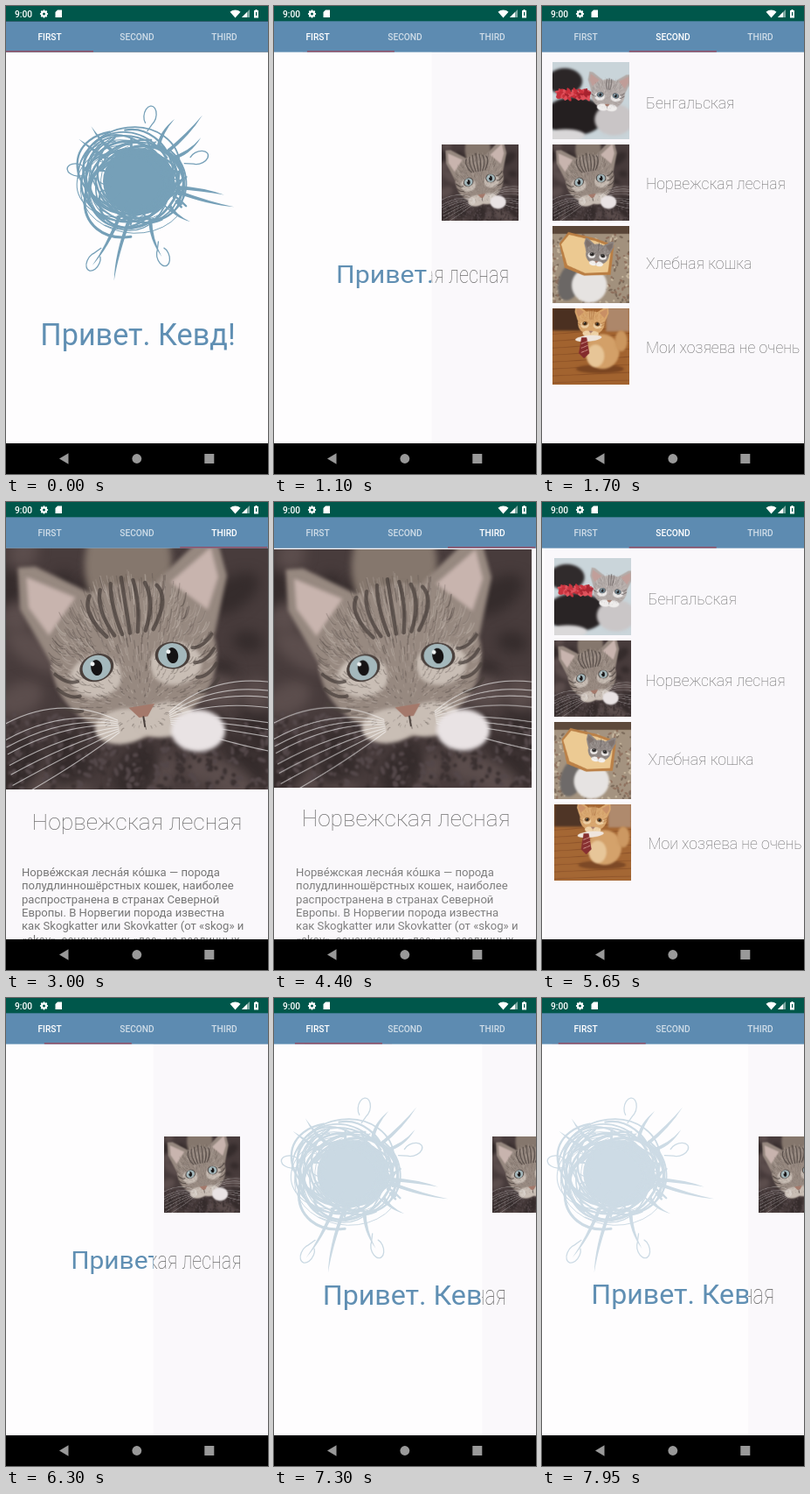
Write an HTML page with a canvas that moves like this. It is 300 px wide and 534 px high and loops after 8000 ms.

```html
<!DOCTYPE html>
<html lang="ru">
<head>
<meta charset="utf-8">
<style>
  html, body { margin: 0; width: 100%; height: 100%; overflow: hidden; background: #000; }
  canvas { display: block; width: 300px; height: 534px; }
</style>
</head>
<body>
<canvas id="stage"></canvas>
<script>
const W = 300, H = 534, LOOP = 8000, STEP = 50;
const STATUS = 17.5, TOP = 52.5, BOTTOM = 499;
const canvas = document.getElementById('stage');
const ctx = canvas.getContext('2d');
const ratio = Math.max(1, window.devicePixelRatio || 1);
canvas.width = W * ratio;
canvas.height = H * ratio;

const lerp = (a, b, u) => a + (b - a) * u;
const clamp = v => Math.max(0, Math.min(1, v));
const linear = u => u;
const easeIn = u => u * u;
const easeOut = u => 1 - (1 - u) ** 3;
const easeBoth = u => u * u * (3 - 2 * u);

// Swipes: start and end time, page reached, easing
const swipes = [
  [0, 850, .24, easeIn],
  [850, 1700, 1, easeBoth],
  [2650, 3000, 2, easeBoth],
  [4350, 4600, 1.41, easeIn],
  [4600, 5150, 1, easeOut],
  [5600, 6300, .437, easeBoth],
  [6400, 6650, .9, easeBoth],
  [6750, 7150, .6, easeIn],
  [7150, 7650, 0, easeOut],
  [7800, 7950, .213, linear]
];

function pageAt(t) {
  return swipes.reduce((page, [start, end, to, ease]) =>
    lerp(page, to, ease(clamp((t - start) / (end - start)))), 0);
}

function seeded(seed) {
  return () => (seed = (seed * 16807) % 2147483647) / 2147483647;
}

// Drawing helpers
function ell(g, color, x, y, rx, ry = rx, rot = 0) {
  g.fillStyle = color;
  g.beginPath();
  g.ellipse(x, y, rx, ry, rot, 0, 7);
  g.fill();
}
function poly(g, color, ...pts) {
  g.fillStyle = color;
  g.beginPath();
  for (let i = 0; i < pts.length; i += 2) g.lineTo(pts[i], pts[i + 1]);
  g.closePath();
  g.fill();
}
function curve(g, color, width, x0, y0, cx, cy, x1, y1) {
  g.strokeStyle = color;
  g.lineWidth = width;
  g.beginPath();
  g.moveTo(x0, y0);
  g.quadraticCurveTo(cx, cy, x1, y1);
  g.stroke();
}
function rect(g, color, x, y, w, h) {
  g.fillStyle = color;
  g.fillRect(x, y, w, h);
}
function picture(w, h, scale, draw) {
  const c = document.createElement('canvas');
  c.width = w * scale;
  c.height = h * scale;
  const g = c.getContext('2d');
  g.scale(scale, scale);
  g.lineCap = 'round';
  draw(g);
  return c;
}
function soft(g, px, draw) {
  g.filter = `blur(${px}px)`;
  draw();
  g.filter = 'none';
}
function speckle(g, colors, count, size, x, y, w, h) {
  const rnd = seeded(count + 7);
  for (let i = 0; i < count; i++) {
    const color = colors[i % colors.length];
    ell(g, color, x + rnd() * w, y + rnd() * h, size * (.4 + rnd()), size * .6, rnd() * 3);
  }
}

// A cat's head in units of its half width
function catHead(g, x, y, r, tilt, look) {
  const { fur, dark, light, ear, eye, stripes = 0, whiskers = 0 } = look;
  const rnd = seeded(19), sides = [-1, 1];
  g.save();
  g.translate(x, y);
  g.rotate(tilt);
  g.scale(r, r);
  soft(g, r * .04, () => {
    for (const s of sides) {
      poly(g, fur, s * .95, -.2, s * 1.2, -.85, s * 1.15, -1.32, s * .95, -1.3, s * .3, -.85);
      poly(g, ear, s * .92, -.5, s * 1.1, -.85, s * 1.07, -1.2, s * .55, -.88);
    }
    ell(g, fur, 0, -.1, .95, .86);
    ell(g, fur, 0, .4, .6, .42);
    for (const s of sides) {
      ell(g, light, s * .46, .05, .3, .24);
      ell(g, light, s * .24, .66, .33, .2);
    }
    ell(g, fur, 0, .1, .17, .45);
  });

  // Fur radiates from the nose
  for (let i = 0; i < 900; i++) {
    const a = rnd() * 2 * Math.PI, d = Math.sqrt(rnd()) * .86, k = 1.13;
    const px = Math.cos(a) * d, py = Math.sin(a) * d * .95 - .1;
    g.globalAlpha = .15 + .25 * rnd();
    curve(g, rnd() < .5 ? dark : light, .012, px, py, px * 1.07, py, px * k, .5 + (py - .5) * k);
  }
  g.globalAlpha = .75;
  for (let i = -stripes; i <= stripes; i++) {
    curve(g, dark, .045, i * .13, -1.02 + Math.abs(i) * .05, i * .17, -.7, i * .09, -.38);
    const s = i < 0 ? -1 : 1, row = Math.abs(i) * .17;
    curve(g, dark, .04, s * .68, row - .1, s * .8, row - .08, s * .92, row - .22);
  }
  g.globalAlpha = 1;

  for (const s of sides) {
    ell(g, dark, s * .44, -.05, .2, .155, s * .2);
    ell(g, eye, s * .44, -.05, .165, .14, s * .2);
    ell(g, '#151314', s * .44, -.05, .065, .09);
    ell(g, '#eef2f2', s * .44 - .04, -.1, .025);
  }
  poly(g, '#a4796b', -.15, .46, .15, .46, .05, .59, -.05, .59);
  curve(g, dark, .02, 0, .59, 0, .65, 0, .7);
  for (let i = 0; i < whiskers; i++) {
    for (const s of sides) {
      const end = .25 + i * .95 / whiskers + rnd() * .08;
      curve(g, 'rgba(255,255,255,.6)', .011, s * .3, .58 + i * .02, s * .9, end - .1, s * 1.6, end + .15);
    }
  }
  g.restore();
}

// Photos
const tabby = picture(300, 276, 2, g => {
  rect(g, '#483c3c', 0, 0, 300, 276);
  soft(g, 14, () => speckle(g, ['#352c2c', '#5c4e4d'], 40, 30, 0, 0, 300, 276));
  soft(g, 2, () => speckle(g, ['#3c3232', '#54484a'], 400, 4, 0, 190, 300, 86));
  soft(g, 8, () => ell(g, '#85776d', 140, 20, 50, 70));
  catHead(g, 148, 135, 100, -.16, {
    fur: '#978980', dark: '#4a403c', light: '#c9beb5', ear: '#c8b4ae',
    eye: '#a4b8bc', stripes: 3, whiskers: 8
  });
  soft(g, 5, () => ell(g, '#e9e3e4', 220, 209, 31, 24));
});

const kittens = picture(87, 88, 3, g => {
  rect(g, '#c9d4d9', 0, 0, 87, 88);
  soft(g, 4, () => {
    ell(g, '#2b2627', 14, 22, 20, 15);
    ell(g, '#241f20', 25, 62, 34, 22);
    ell(g, '#c9c5c6', 70, 66, 22, 18);
    ell(g, '#d9d7d8', 15, 84, 22, 7);
  });
  speckle(g, ['#c9303b', '#e0505a', '#a8232f'], 90, 3, 6, 33, 36, 9);
  catHead(g, 63, 39, 20, .08, {
    fur: '#b3aaa7', dark: '#5a5251', light: '#efedec', ear: '#c09d98', eye: '#6b828e', stripes: 1
  });
});

const bread = picture(87, 88, 3, g => {
  rect(g, '#a2917d', 0, 0, 87, 88);
  speckle(g, ['#7b6959', '#c4b49c', '#8d6f5c'], 260, 2, 0, 10, 87, 78);
  rect(g, '#594537', 0, 0, 87, 9);
  soft(g, 3, () => {
    ell(g, '#6b6765', 20, 64, 13, 22, .3);
    ell(g, '#e6e3e1', 42, 68, 20, 20);
  });
  poly(g, '#ba7e43', 8, 20, 18, 7, 48, 14, 70, 22, 66, 56, 36, 57, 14, 48);
  poly(g, '#ecc991', 10, 21, 19, 10, 48, 17, 67, 24, 63, 53, 37, 54, 17, 45);
  catHead(g, 51, 34, 14, .15, {
    fur: '#8d8480', dark: '#4c4644', light: '#f4f1ef', ear: '#7c706b', eye: '#3a3735'
  });
});

const ginger = picture(87, 88, 3, g => {
  rect(g, '#a2632f', 0, 0, 87, 88);
  for (let i = 0; i < 9; i++) curve(g, '#8a4f25', .8, 0, 30 + i * 8, 40, 28 + i * 8, 87, 20 + i * 9);
  soft(g, 3, () => {
    rect(g, '#4b3021', 0, 0, 32, 26);
    rect(g, '#ad876a', 61, 0, 26, 27);
    ell(g, '#7a4521', 54, 70, 27, 5);
    ell(g, '#d3a068', 57, 50, 19, 20);
    ell(g, '#cb965e', 78, 38, 7, 12);
    ell(g, '#e7c597', 49, 55, 10, 13);
  });
  catHead(g, 44, 19, 16, .05, {
    fur: '#d9a66c', dark: '#a3683a', light: '#efd3a8', ear: '#c98f64', eye: '#6b4a26', stripes: 1
  });
  ell(g, '#efe5dc', 41, 35, 15, 3.5, -.1);
  poly(g, '#842b2c', 33, 34, 39, 34, 42, 52, 36, 58, 30, 52);
  for (let i = 0; i < 3; i++) curve(g, '#d59a90', .8, 33, 41 + i * 5, 36, 40 + i * 5, 40, 38 + i * 5);
});

// Scribble: loops and dashes around a dense core, with loose ends
const looseEnds = [
  [-60, 82], [-46, 105], [-35, 87], [-131, 83], [-145, 84], [9, 99],
  [15, 113], [38, 75], [73, 90], [104, 117], [119, 110]
];
const curls = [[165, 125], [81, 187], [180, 286], [221, 173], [100, 292]];

function scribble(color) {
  const rnd = seeded(77), cx = 152, cy = 200;
  const jitter = size => (rnd() - .5) * size;
  ctx.lineCap = 'round';
  ctx.strokeStyle = color;
  ell(ctx, color, cx, cy, 41, 38);
  for (let i = 0; i < 26; i++) {
    const start = rnd() * 7;
    ctx.lineWidth = .9 + rnd() * 2.2;
    ctx.beginPath();
    ctx.ellipse(146 + jitter(26), 200 + jitter(24), 42 + rnd() * 19, 36 + rnd() * 17,
      jitter(1.6), start, start + 3.5 + rnd() * 2);
    ctx.stroke();
  }
  for (let i = 0; i < 34; i++) {
    const a = rnd() * 7, x = cx + 42 * Math.cos(a), y = cy + 38 * Math.sin(a);
    curve(ctx, color, 1 + rnd() * 2, x + jitter(24), y + jitter(24), x, y, x + jitter(30), y + jitter(30));
  }
  for (const [deg, reach] of looseEnds) {
    const a = deg * Math.PI / 180, dx = Math.cos(a), dy = Math.sin(a), bend = jitter(16);
    const mx = cx + dx * reach * .75 - dy * bend, my = cy + dy * reach * .75 + dx * bend;
    ctx.fillStyle = color;
    ctx.beginPath();
    ctx.moveTo(cx + dx * 45 - dy * 2, cy + dy * 45 + dx * 2);
    ctx.quadraticCurveTo(mx - dy * 2, my + dx * 2, cx + dx * reach, cy + dy * reach);
    ctx.quadraticCurveTo(mx + dy * 2, my - dx * 2, cx + dx * 45 + dy * 2, cy + dy * 45 - dx * 2);
    ctx.fill();
  }
  ctx.lineWidth = 1.3;
  for (const [x, y] of curls) {
    const inward = Math.atan2(cy - y, cx - x);
    ctx.beginPath();
    ctx.ellipse(x, y, 11, 7, inward, .6, 5.6);
    ctx.lineTo(x + 18 * Math.cos(inward), y + 18 * Math.sin(inward));
    ctx.stroke();
  }
}

// Text
const FAMILY = 'Roboto, sans-serif';
const font = (weight, size) => `${weight} ${size}px ${FAMILY}`;
function write(text, x, y, weight, size, color, align = 'left') {
  ctx.font = font(weight, size);
  ctx.textAlign = align;
  ctx.fillStyle = color;
  ctx.fillText(text, x, y);
}
function widthOf(text, weight, size) {
  ctx.font = font(weight, size);
  return ctx.measureText(text).width;
}

const GREETING = 'Привет. Кевд!', BREED = 'Норвежская лесная';
const GREY = '#666', THIN = 100, LIST_X = 119, LIST_SIZE = 17.6, PHOTO = 87.5;
const rows = [
  ['Бенгальская', 117, kittens],
  [BREED, 208.5, tabby],
  ['Хлебная кошка', 299.7, bread],
  ['Мои хозяева не очень', 395.5, ginger]
];
const photoTop = row => 64 + 93.5 * row;
const story = [
  'Норве\u0301жская лесна\u0301я ко\u0301шка — порода',
  'полудлинношёрстных кошек, наиболее',
  'распространена в странах Северной',
  'Европы. В Норвегии порода известна',
  'как Skogkatter или Skovkatter (от «skog» и',
  '«skov», означающих «лес» на различных'
];

// Resting place of the shared heading on each page
function headingBoxes() {
  const box = (text, weight, size, x, y) => ({ x, y, size, w: widthOf(text, weight, size) });
  const title = box(BREED, THIN, 26.5, 0, 373.5);
  title.x = (W - title.w) / 2;
  return [box(GREETING, 400, 34.2, 39.3, 387), box(BREED, THIN, LIST_SIZE, LIST_X, 208.5), title];
}

function heading(text, weight, color, own, a, b, u) {
  ctx.save();
  ctx.translate(lerp(a.x, b.x, u), lerp(a.y, b.y, u));
  ctx.scale(lerp(a.w, b.w, u) / own.w, lerp(a.size, b.size, u) / own.size);
  write(text, 0, 0, weight, own.size, color);
  ctx.restore();
}

function clipped(x, w, draw) {
  ctx.save();
  ctx.beginPath();
  ctx.rect(x, TOP, w, BOTTOM - TOP);
  ctx.clip();
  draw();
  ctx.restore();
}

function drawList(shift, alpha) {
  ctx.globalAlpha = alpha;
  rows.forEach(([name, base, photo], i) => {
    if (name === BREED) return;
    ctx.drawImage(photo, 12 + shift, photoTop(i), PHOTO, PHOTO);
    write(name, LIST_X + shift, base, THIN, LIST_SIZE, GREY);
  });
  ctx.globalAlpha = 1;
}

function drawPages(p) {
  const boxes = headingBoxes();
  const fade = page => clamp(1 - 3 * Math.abs(p - page));
  rect(ctx, '#faf8fb', 0, TOP, W, BOTTOM - TOP);
  if (p < 1) {
    const edge = W * (1 - p), [a, b] = boxes;
    clipped(0, edge, () => {
      rect(ctx, '#fefdfe', 0, TOP, W, BOTTOM - TOP);
      const mix = (from, to) => Math.round(lerp(from, to, fade(0)));
      if (fade(0)) {
        ctx.save();
        ctx.translate(-W * p, 0);
        scribble(`rgb(${mix(254, 118)},${mix(253, 160)},${mix(254, 184)})`);
        ctx.restore();
      }
      heading(GREETING, 400, '#608fb3', a, a, b, p);
    });
    clipped(edge, W - edge, () => {
      drawList(edge, fade(1));
      ctx.drawImage(tabby, 12 + edge, photoTop(1), PHOTO, PHOTO);
      heading(BREED, THIN, GREY, b, a, b, p);
    });
    return;
  }
  const u = p - 1, [, a, b] = boxes;
  clipped(0, W, () => {
    drawList(-W * u, fade(1));
    ctx.globalAlpha = fade(2);
    story.forEach((line, i) => write(line, 18 + W * (1 - u), 426.7 + i * 15.4, 400, 13.1, '#757575'));
    ctx.globalAlpha = 1;
    ctx.drawImage(tabby, lerp(12, 0, u), lerp(photoTop(1), 52, u), lerp(PHOTO, W, u), lerp(PHOTO, 276, u));
    heading(BREED, THIN, GREY, u > .5 ? b : a, a, b, u);
  });
}

function drawStatus() {
  rect(ctx, '#00574b', 0, 0, W, STATUS);
  write('9:00', 10, 12.6, 500, 10.2, '#fff');
  for (let i = 0; i < 8; i++) {
    const a = i * Math.PI / 4;
    ell(ctx, '#fff', 43.5 + 3.6 * Math.cos(a), 9 + 3.6 * Math.sin(a), 1.1);
  }
  ell(ctx, '#fff', 43.5, 9, 3.6);
  ell(ctx, '#00574b', 43.5, 9, 1.5);
  poly(ctx, '#fff', 59, 4.5, 64, 4.5, 64, 13, 56.5, 13, 56.5, 7);
  ctx.fillStyle = '#fff';
  ctx.beginPath();
  ctx.moveTo(262.5, 13.5);
  ctx.arc(262.5, 13.5, 9, -2.3, -.84);
  ctx.fill();
  poly(ctx, '#7faaa3', 270, 13, 279, 4, 279, 13);
  poly(ctx, '#fff', 270, 13, 276, 7, 276, 13);
  rect(ctx, '#fff', 284, 5, 5, 8.5);
  rect(ctx, '#fff', 285.5, 4, 2, 1);
  rect(ctx, '#00574b', 286, 7, 1.2, 4);
}

function drawBars(p, indicator) {
  drawStatus();
  rect(ctx, '#5d8bb1', 0, STATUS, W, TOP - STATUS);
  ['FIRST', 'SECOND', 'THIRD'].forEach((name, i) => {
    const color = i === Math.round(p) ? '#fff' : 'rgba(255,255,255,.7)';
    write(name, 50 + i * 100, 39, 500, 10.2, color, 'center');
  });
  rect(ctx, '#8f5068', indicator * 100, TOP - 1.5, 100, 1.5);

  rect(ctx, '#000', 0, BOTTOM, W, H - BOTTOM);
  poly(ctx, '#999', 61, 516.5, 71.5, 510.3, 71.5, 522.7);
  ell(ctx, '#999', 149.8, 516.5, 5.4);
  rect(ctx, '#999', 227.3, 511, 11, 11);
}

function frame(now) {
  const t = Math.floor((now % LOOP) / STEP) * STEP;
  const p = pageAt(t);
  ctx.setTransform(ratio, 0, 0, ratio, 0, 0);
  ctx.imageSmoothingQuality = 'high';
  drawPages(p);
  // The tab indicator trails the pager by one screen refresh
  drawBars(p, pageAt(t - 18));
  requestAnimationFrame(frame);
}
requestAnimationFrame(frame);
</script>
</body>
</html>
```
